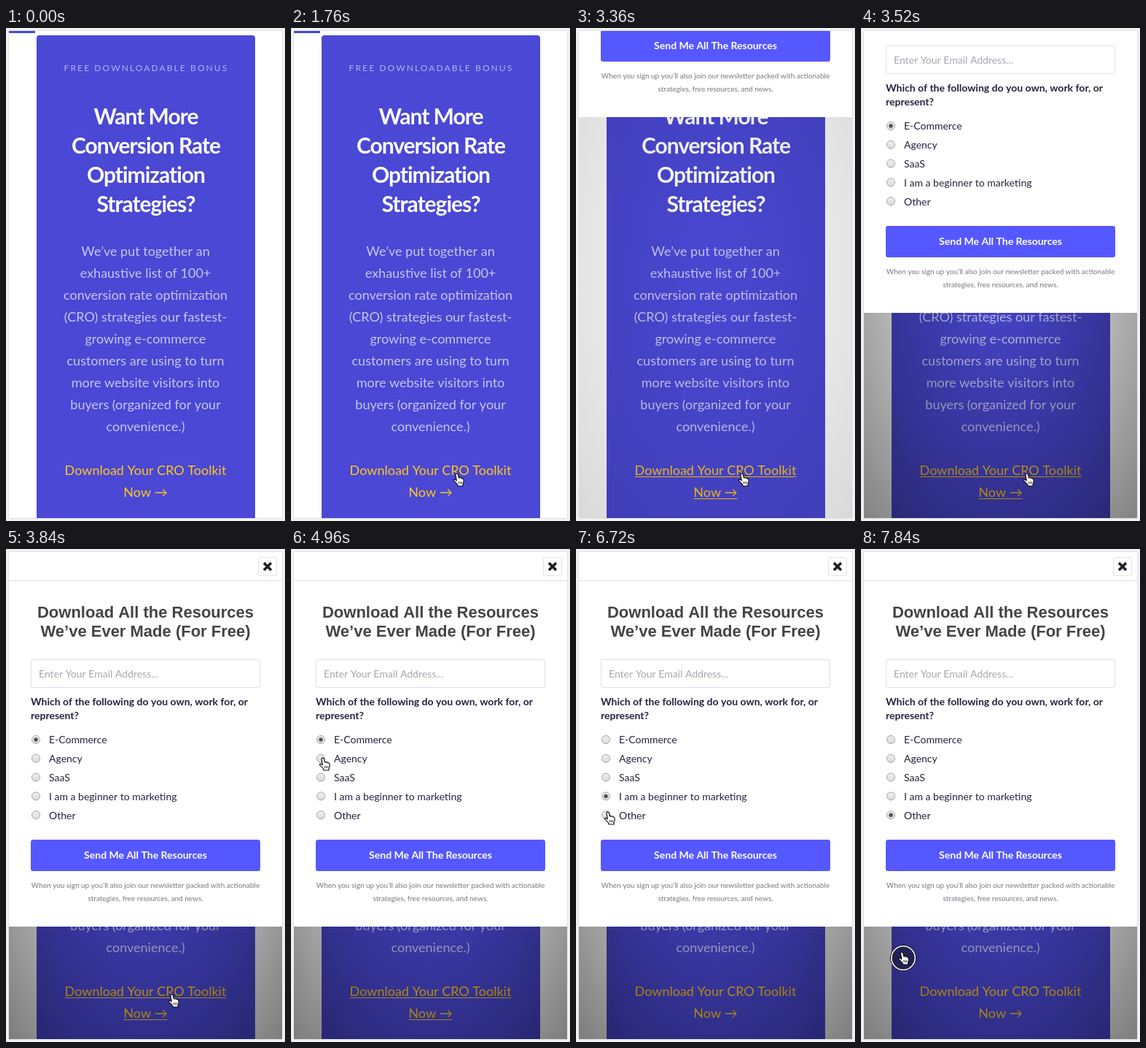
Animation of 383 by 675 pixels, one loop 8000 ms. Source, as an HTML page with a canvas:

```html
<!DOCTYPE html>
<html lang="en">
<head>
<meta charset="utf-8">
<title>Sign-up popup</title>
<style>
html, body { margin: 0; width: 100%; height: 100%; overflow: hidden; background: #f2f2f2; }
canvas { display: block; width: 383px; height: 675px; }
</style>
</head>
<body>
<canvas id="stage"></canvas>
<script>
const W = 383, H = 675, LOOP = 8000, STEP = 160;
const LATO = 'Lato, sans-serif', ARIAL = '"Liberation Sans", Arial, sans-serif';
const BLUE = '#4a48d4';
const canvas = document.getElementById('stage');
const ctx = canvas.getContext('2d');
const dpr = window.devicePixelRatio || 1;
canvas.width = W * dpr;
canvas.height = H * dpr;

const bodyLines = [
  'We’ve put together an', 'exhaustive list of 100+', 'conversion rate optimization',
  '(CRO) strategies our fastest-', 'growing e-commerce', 'customers are using to turn',
  'more website visitors into', 'buyers (organized for your', 'convenience.)'
];
const titleLines = ['Want More', 'Conversion Rate', 'Optimization', 'Strategies?'];
const linkLines = ['Download Your CRO Toolkit', 'Now →'];
const options = ['E-Commerce', 'Agency', 'SaaS', 'I am a beginner to marketing', 'Other'];

// Pointer track: time, x, y of the tip
const track = [
  [160, 344, 330], [320, 338, 341], [480, 338, 341], [1120, 290, 500], [1600, 231, 617],
  [1760, 227.5, 610], [4160, 227.5, 610], [4480, 190, 420], [4800, 75, 215],
  [4960, 43.5, 286], [5280, 43.5, 286], [5600, 43.5, 312], [5920, 43.5, 312],
  [6080, 43.5, 338], [6400, 43.5, 338], [6720, 43.5, 360], [7040, 43.5, 360],
  [7680, 56, 552], [8000, 56, 552]
];
const clicks = [3200, 5120, 5760, 6240, 6880, 7840];

const clamp = v => Math.max(0, Math.min(1, v));
const swing = u => 0.5 - 0.5 * Math.cos(Math.PI * clamp(u));

function rect(x, y, w, h, fill) {
  ctx.fillStyle = fill;
  ctx.fillRect(x, y, w, h);
}

function box(x, y, w, h, r, fill, stroke) {
  ctx.beginPath();
  ctx.roundRect(x, y, w, h, r);
  if (fill) { ctx.fillStyle = fill; ctx.fill(); }
  if (stroke) { ctx.strokeStyle = stroke; ctx.lineWidth = 1; ctx.stroke(); }
}

function disc(x, y, r, fill, stroke, width = 1) {
  ctx.beginPath();
  ctx.arc(x, y, r, 0, 2 * Math.PI);
  if (fill) { ctx.fillStyle = fill; ctx.fill(); }
  if (stroke) { ctx.strokeStyle = stroke; ctx.lineWidth = width; ctx.stroke(); }
}

function text(str, x, y, font, fill, align = 'center', spacing = 0) {
  ctx.font = font;
  ctx.letterSpacing = spacing + 'px';
  ctx.textAlign = align;
  ctx.fillStyle = fill;
  ctx.fillText(str, x, y);
}

function lines(list, x, y, gap, font, fill, align, spacing) {
  list.forEach((s, i) => text(s, x, y + i * gap, font, fill, align, spacing));
}

function drawPage(underlined) {
  rect(4, 4, 36, 3, BLUE);
  box(42, 10, 300, 680, 4, BLUE);
  text('FREE DOWNLOADABLE BONUS', 192.5, 59, '12px ' + LATO, '#b4b3ee', 'center', 2.1);
  lines(titleLines, 192, 132, 40, 'bold 30px ' + LATO, '#fff', 'center', -1);
  lines(bodyLines, 191.5, 312, 30, '18px ' + LATO, '#c6c5f0');
  lines(linkLines, 191.5, 612, 30, '18px ' + LATO, '#ffc71f');
  if (underlined) linkLines.forEach((s, i) => {
    const w = ctx.measureText(s).width;
    rect(191.5 - w / 2, 614 + i * 30, w, 1, '#ffc71f');
  });
}

function drawBackdrop(alpha) {
  if (alpha <= 0) return;
  ctx.save();
  ctx.globalAlpha = alpha;
  ctx.translate(191.5, 337.5);
  ctx.scale(187.5, 333.5);
  const g = ctx.createRadialGradient(0, 0, 0, 0, 0, Math.SQRT2);
  g.addColorStop(0, 'rgba(0,0,0,0.02)');
  g.addColorStop(1, 'rgba(0,0,0,0.51)');
  rect(-1, -1, 2, 2, g);
  ctx.restore();
}

function drawRadio(y, on) {
  const g = ctx.createLinearGradient(0, y - 6, 0, y + 6);
  g.addColorStop(0, '#f2f2f2');
  g.addColorStop(1, '#d9d9d9');
  disc(41, y, 5.5, g, '#a6a6a6');
  if (on) disc(41, y, 2.7, '#505050');
}

function drawPopup(shift, picked) {
  ctx.save();
  ctx.translate(0, shift);
  rect(4, 4, 375, 513, '#fff');
  rect(4, 43, 375, 1, '#dedede');
  box(346.5, 11.5, 25, 25, 2, '#fff', '#e2e2e2');
  ctx.strokeStyle = '#1c1c28';
  ctx.lineWidth = 3.4;
  ctx.beginPath();
  ctx.moveTo(354, 19); ctx.lineTo(364, 29);
  ctx.moveTo(364, 19); ctx.lineTo(354, 29);
  ctx.stroke();

  lines(['Download All the Resources', 'We’ve Ever Made (For Free)'], 191.5, 93.5, 26,
    'bold 22px ' + ARIAL, '#444');
  box(34.5, 151.5, 314, 38, 2, '#fff', '#dddee8');
  text('Enter Your Email Address...', 45, 176, '14px ' + LATO, '#a6a6b0', 'left');
  lines(['Which of the following do you own, work for, or', 'represent?'], 34, 214, 19,
    'bold 14px ' + LATO, '#23233f', 'left');
  options.forEach((s, i) => {
    drawRadio(261 + i * 25.8, i === picked);
    text(s, 59, 266 + i * 26, '14px ' + LATO, '#23233f', 'left');
  });
  box(34, 398, 315, 43, 3, '#5558ff');
  text('Send Me All The Resources', 191.5, 424, 'bold 14px ' + LATO, '#fff');
  lines(['When you sign up you’ll also join our newsletter packed with actionable',
    'strategies, free resources, and news.'], 191.5, 464, 18, '10px ' + LATO, '#777780');
  ctx.restore();
}

const hand = new Path2D('M-1.6 1.4Q-1.2-.4.3-.1Q1.5.2 1.9 2L3 6Q4 5.1 5.4 6.1Q6.6 5.6 7.4 7' +
  'Q9 6.6 9.5 8.6Q10.2 11.2 8.6 14L8.5 17H1.6L1 15Q-1 12.4-3.4 10.4Q-4.7 8.9-3.6 8.2Q-2.4 7.7-.2 9.7Z');
const knuckles = new Path2D('M2.8 11V14.2M4.8 11V14.2M6.7 11V14.2');
const arrow = new Path2D('M0 0V14.5L3.4 11.4L5.6 16.5L8 15.5L5.8 10.5H10.4Z');

function drawPointer(x, y, isHand, clicking) {
  if (clicking) {
    const cx = x + 2, cy = y + 8;
    disc(cx, cy, 17.5, 'rgba(20,20,40,0.5)', '#111', 1);
    disc(cx, cy, 16.2, null, '#fff', 1.6);
    disc(cx, cy, 14.8, null, '#222', 1);
  }
  ctx.save();
  ctx.translate(x, y);
  ctx.lineJoin = 'round';
  if (isHand) {
    ctx.lineWidth = 1.2;
    ctx.fillStyle = '#fff';
    ctx.strokeStyle = '#111';
    ctx.fill(hand);
    ctx.stroke(hand);
    ctx.lineWidth = 0.8;
    ctx.stroke(knuckles);
  } else {
    ctx.lineWidth = 2;
    ctx.strokeStyle = '#fff';
    ctx.fillStyle = '#111';
    ctx.stroke(arrow);
    ctx.fill(arrow);
  }
  ctx.restore();
}

function pointerAt(t) {
  const i = Math.max(1, track.findIndex(k => k[0] > t));
  const [t0, x0, y0] = track[i - 1], [t1, x1, y1] = track[i];
  const u = clamp((t - t0) / (t1 - t0));
  return [x0 + (x1 - x0) * u, y0 + (y1 - y0) * u];
}

function draw(t) {
  ctx.setTransform(dpr, 0, 0, dpr, 0, 0);
  rect(0, 0, W, H, '#f2f2f2');
  box(3.5, 3.5, 376, 668, 1, '#fff', '#e1e1e1');

  ctx.save();
  ctx.beginPath();
  ctx.rect(4, 4, 375, 667);
  ctx.clip();
  drawPage(t >= 3200 && t < 5120);
  drawBackdrop(clamp((t - 3290) / 240));
  const open = swing((t - 3215) / 456);
  const picked = clicks.slice(1, 5).filter(c => t >= c + STEP).length;
  if (open > 0) drawPopup(Math.round(-513 * (1 - open)), picked);
  ctx.restore();

  if (t >= 160) {
    const [x, y] = pointerAt(t);
    const isHand = (t >= 1600 && t < 4320) || t >= 4960;
    drawPointer(x, y, isHand, clicks.some(c => t >= c && t < c + STEP));
  }
}

const start = performance.now();
function tick() {
  const t = (performance.now() - start) % LOOP;
  draw(Math.floor(t / STEP) * STEP);
  requestAnimationFrame(tick);
}
tick();
</script>
</body>
</html>
```
